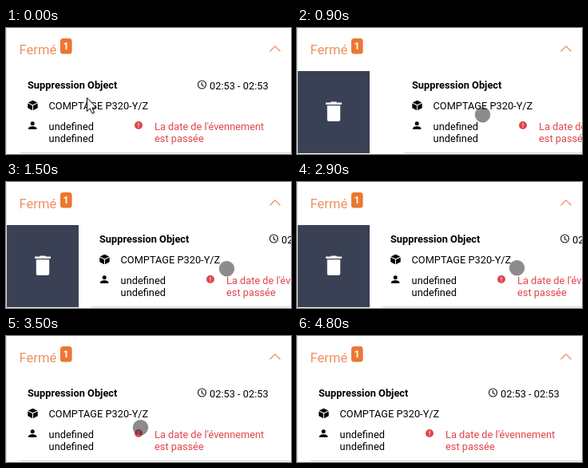
Write an HTML page that moves like this. It is 357 px wide and 158 px high and loops after 5.3 s.

```html
<!DOCTYPE html>
<html lang="fr">
<head>
<meta charset="utf-8">
<title>Swipe</title>
<style>
html, body { margin: 0; width: 100%; height: 100%; overflow: hidden; background: #fff; }
svg { display: block; width: 357px; height: 158px; }
text { font: 12.8px Roboto, sans-serif; white-space: pre; }
.bold { font-weight: 700; }
.red { fill: #e0454c; }
.head { font-size: 16.6px; fill: #ee9060; }
.badge { font-size: 12.5px; font-weight: 700; fill: #fff; text-anchor: middle; }
</style>
</head>
<body>
<svg viewBox="0 0 357 158">
  <rect width="357" height="158" fill="#fff"/>
  <text class="head" x="16.500" y="33">Fermé</text>
  <rect x="68" y="13" width="14.600" height="19.500" rx="3.500" fill="#ec7731"/>
  <text class="badge" x="75" y="26.500">1</text>
  <path d="M330.500 29.300L337 22.800L343.500 29.300" fill="none" stroke="#ee8f5d" stroke-width="1.3"/>

  <rect x="1" y="54" width="90" height="103" fill="#3a4154"/>
  <path d="M36 93.500H41.500L43 92.500H49L50.500 93.500H56V96H36ZM37.800 97.200H54.200V114.500Q54.200 117 51.700 117H40.300Q37.800 117 37.800 114.500Z" fill="#fff"/>

  <g id="row">
    <rect x="1" y="54" width="357" height="103" fill="#fff"/>
    <rect x="17" y="156" width="341" height="1" fill="#d3d3d3"/>
    <text class="bold" x="27" y="76">Suppression Object</text>
    <g fill="none" stroke="#111" stroke-width="1.1">
      <circle cx="245.500" cy="71" r="5"/>
      <path d="M245.300 68V71.500L248 73.200"/>
    </g>
    <text x="255" y="77">02:53 - 02:53</text>
    <path d="M33.500 90.800L39.300 93.500L33.500 96.300L27.700 93.500ZM27.300 94.500L33 97.200V103.300L27.300 100.300ZM39.700 94.500L34 97.200V103.300L39.700 100.300Z"/>
    <text x="53.500" y="102">COMPTAGE P320-Y/Z</text>
    <circle cx="33.200" cy="119.700" r="2.500"/>
    <path d="M28 127V125.800C28 124 31.400 123.200 33.200 123.200S38.400 124 38.400 125.800V127Z"/>
    <text x="53.600" y="128">undefined</text>
    <text x="53.600" y="143">undefined</text>
    <circle cx="166" cy="122" r="5" fill="#e0454c"/>
    <path d="M166 119.200V122.600M166 123.700V124.800" stroke="#fff"/>
    <text class="red" x="186" y="128">La date de l'évennement</text>
    <text class="red" x="186" y="143">est passée</text>
  </g>
  <rect width="1" height="158" fill="#dcdcdc"/>

  <circle id="touch" cx=".5" cy="-.3" r="9.500" fill="rgba(45,45,45,.55)" stroke="rgba(70,70,70,.4)" stroke-width=".6"/>
  <path id="arrow" d="M.5 .5V17.500L4.200 14L7 20.300L9.700 19.100L7 13H12.300Z" fill="#fff" stroke="#000"/>
</svg>
<script>
const LOOP = 5300;
// [start ms, pointer, x, y, row offset]
const steps = [
  [0, 'arrow', 101, 87, 0],
  [100, 'touch', 101, 90, 0],
  [600, 'touch', 118, 94, 12],
  [700, 'touch', 160, 101, 55],
  [800, 'touch', 202, 106, 98],
  [900, 'touch', 232, 109, 117],
  [1000, 'touch', 255, 109, 129],
  [1100, 'touch', 270, 109, 137],
  [1200, 'touch', 275, 109, 122],
  [1300, 'touch', 276, 109, 101],
  [1400, 'touch', 276, 109, 93],
  [1500, 'touch', 276, 109, 90],
  [2900, 'touch', 275, 108, 90],
  [3100, 'touch', 258, 109, 72],
  [3200, 'touch', 226, 111, 38],
  [3300, 'touch', 193, 113, 5],
  [3400, 'touch', 177, 114, 1],
  [3500, 'touch', 168, 115, 0],
  [3600, 'touch', 163, 116, 0],
  [3700, 'touch', 160, 116, 0],
  [3800, 'touch', 159, 116.5, 0],
  [3900, 'touch', 158, 116.5, 0],
  [4600, 'arrow', 157, 106, 0],
  [4700, 'arrow', 113, 19, 0],
  [4800, 'none', 0, 0, 0]
];
const [row, touch, arrow] = ['row', 'touch', 'arrow'].map(id => document.getElementById(id));
const move = (el, x, y) => el.setAttribute('transform', `translate(${x} ${y})`);

function draw(ms) {
  const [, pointer, x, y, offset] = steps.findLast(s => s[0] <= ms);
  move(row, offset, 0);
  for (const el of [touch, arrow]) {
    el.style.display = el.id === pointer ? '' : 'none';
    move(el, x, y);
  }
}

const start = performance.now();
function tick() {
  draw((performance.now() - start) % LOOP);
  requestAnimationFrame(tick);
}
tick();
</script>
</body>
</html>
```
